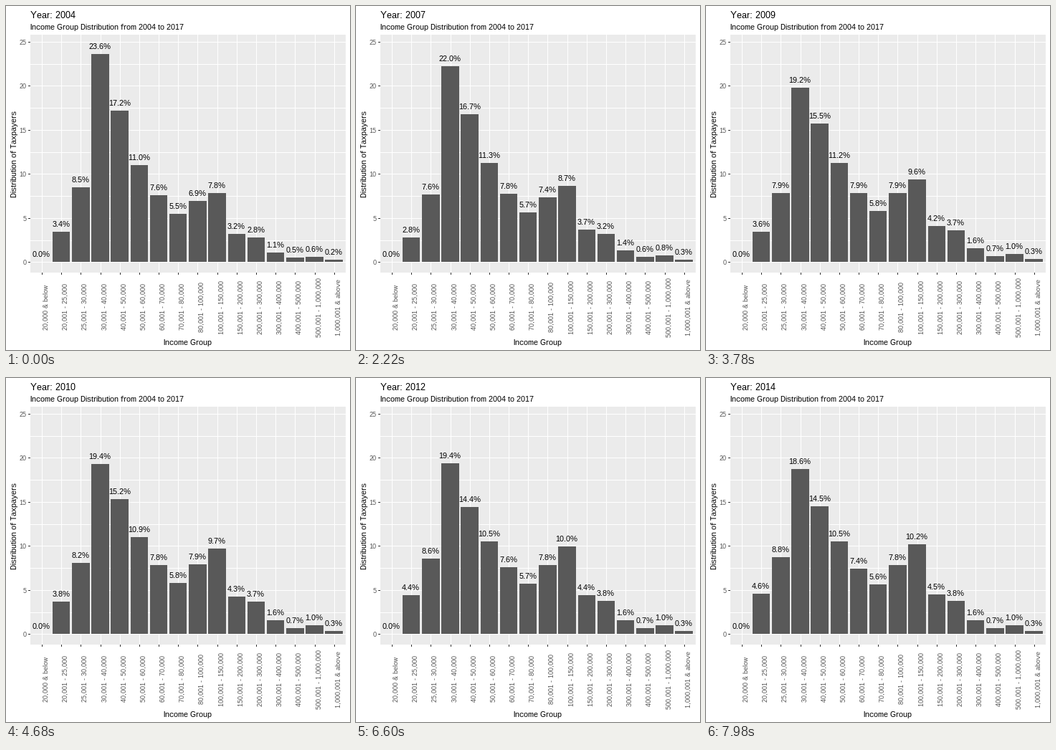
Recreate the animation shown at these times as a matplotlib script. Size 480x480 px, loop 8 s.

```python
import numpy as np
import matplotlib.pyplot as plt
from matplotlib.animation import FuncAnimation
from matplotlib.collections import PolyCollection

SIZE, DPI = 480, 100
STEP = 20                # ms per tick
HOLD = 3                 # ticks per picture
TICKS = 400
FIRST_YEAR, SPAN, LAST = 2004, 13, 179   # years covered over LAST pictures

LEFT, RIGHT, TOP, BOTTOM = 34, 474, 40, 372
ZERO_X, UNIT_X = 33.66, 27.184
ZERO_Y, UNIT_Y = 357.3, 12.295

# Group limits in thousands
EDGES = [20, 25, 30, 40, 50, 60, 70, 80, 100, 150, 200, 300, 400, 500, 1000]
GROUPS = (["20,000 & below"]
          + [f"{a * 1000 + 1:,} - {b * 1000:,}"
             for a, b in zip(EDGES, EDGES[1:])]
          + ["1,000,001 & above"])
N = len(GROUPS)

# The low groups swing, so they get more turning points
SWING_YEARS = [0, 1, 3, 5, 7, 8, 10]
SWINGS = [
    [3.4, 2.7, 2.8, 3.6, 3.9, 4.4, 4.6],
    [8.5, 8.2, 7.6, 7.9, 8.5, 8.6, 8.8],
    [23.6, 23.6, 22.0, 19.2, 19.6, 19.4, 18.6],
    [17.2, 17.0, 16.7, 15.5, 15.0, 14.4, 14.5],
    [11.0, 11.2, 11.3, 11.2, 10.7, 10.5, 10.5],
]
# The others drift: start, middle and end of the decade
DRIFTS = [
    [7.6, 7.9, 7.4], [5.5, 5.8, 5.6], [6.9, 7.9, 7.8], [7.8, 9.6, 10.2],
    [3.2, 4.2, 4.5], [2.8, 3.7, 3.8], [1.1, 1.6, 1.6], [0.5, 0.7, 0.7],
    [0.6, 1.0, 1.0], [0.24, 0.34, 0.34],
]


def build_table():
    """One row per year, one column per group."""
    years = np.arange(11)
    pace = np.interp(years, [0, 3, 5, 10], [0, 0.5, 1, 2])  # slow start
    columns = [np.zeros(len(years))]
    columns += [np.interp(years, SWING_YEARS, s) for s in SWINGS]
    columns += [np.interp(pace, [0, 1, 2], d) for d in DRIFTS]
    return np.array(columns).T


TABLE = build_table()
KEYS = np.round(np.arange(len(TABLE)) * LAST / SPAN)
MIDS = (KEYS[1:] + KEYS[:-1]) / 2


def x_pos(c):
    return ZERO_X + (0.6 + c) * UNIT_X


def y_pos(value):
    return ZERO_Y - value * UNIT_Y


def box(x0, y0, x1, y1):
    return [(x0, y0), (x1, y0), (x1, y1), (x0, y1)]


# Crisp whole-pixel glyphs without kerning
plt.rcParams.update({
    "font.family": "Liberation Sans",
    "text.hinting": "default",
    "text.hinting_factor": 1,
    "text.kerning_factor": 6,
})
fig = plt.figure(figsize=(SIZE / DPI, SIZE / DPI), dpi=DPI, facecolor="white")
ax = fig.add_axes([0, 0, 1, 1])
ax.set_xlim(0, SIZE)
ax.set_ylim(SIZE, 0)
ax.axis("off")


def boxes(shapes, color):
    coll = PolyCollection(shapes, facecolors=color, edgecolors="none",
                          linewidths=0, antialiaseds=False)
    ax.add_collection(coll, autolim=False)
    return coll


def text(x, y, s, px, color="black", **kw):
    return ax.text(x, y, s, fontsize=px * 72 / DPI, color=color,
                   va="baseline", **kw)


def upright(x, y, s, px, color="black"):
    return text(x, y, s, px, color, rotation=90, rotation_mode="anchor",
                ha="center")


# Panel, grid and ticks
majors = [round(y_pos(v)) for v in range(0, 26, 5)]
minors = [round(y_pos(v + 2.5)) for v in range(0, 25, 5)]
columns = [round(x_pos(c)) for c in range(N)]

boxes([box(LEFT, TOP, RIGHT, BOTTOM)], "#EBEBEB")
boxes([box(LEFT, y, RIGHT, y + 1) for y in majors + minors]
      + [box(x, TOP, x + 1, BOTTOM) for x in columns], "white")
boxes([box(LEFT - 3, y, LEFT, y + 1) for y in majors]
      + [box(x, BOTTOM, x + 1, BOTTOM + 3) for x in columns], "#333333")

for k, y in enumerate(majors):
    text(28.7, y + 3.8, str(5 * k), 9, "#4D4D4D", ha="right")
for x, name in zip(columns, GROUPS):
    upright(x + 9, 420, name, 9, "#4D4D4D")

text(253.5, 473, "Income Group", 11, ha="center")
upright(15, 207, "Distribution of Taxpayers", 11)
text(34, 33, "Income Group Distribution from 2004 to 2017", 11)
title = text(34, 17, "", 13)

bars = boxes([box(0, 0, 0, 0)], "#595959")
labels = [text(x_pos(c) - 0.5, 0, "", 11, ha="center") for c in range(N)]


def update(tick):
    step = tick // HOLD
    title.set_text(f"Year: {round(FIRST_YEAR + SPAN * step / LAST)}")
    shown = TABLE[np.searchsorted(MIDS, step, side="right")]
    shapes = []
    for c, label in enumerate(labels):
        top = round(y_pos(np.interp(step, KEYS, TABLE[:, c])))
        x = x_pos(c)
        shapes.append(box(round(x - 0.45 * UNIT_X), top,
                          round(x + 0.45 * UNIT_X), round(ZERO_Y)))
        label.set_text(f"{shown[c]:.1f}%")
        label.set_y(top - 7)
    bars.set_verts(shapes[1:])
    return [title, bars, *labels]


anim = FuncAnimation(fig, update, frames=TICKS, interval=STEP,
                     init_func=lambda: update(0), repeat=True,
                     repeat_delay=0, blit=False)
plt.show()
```
